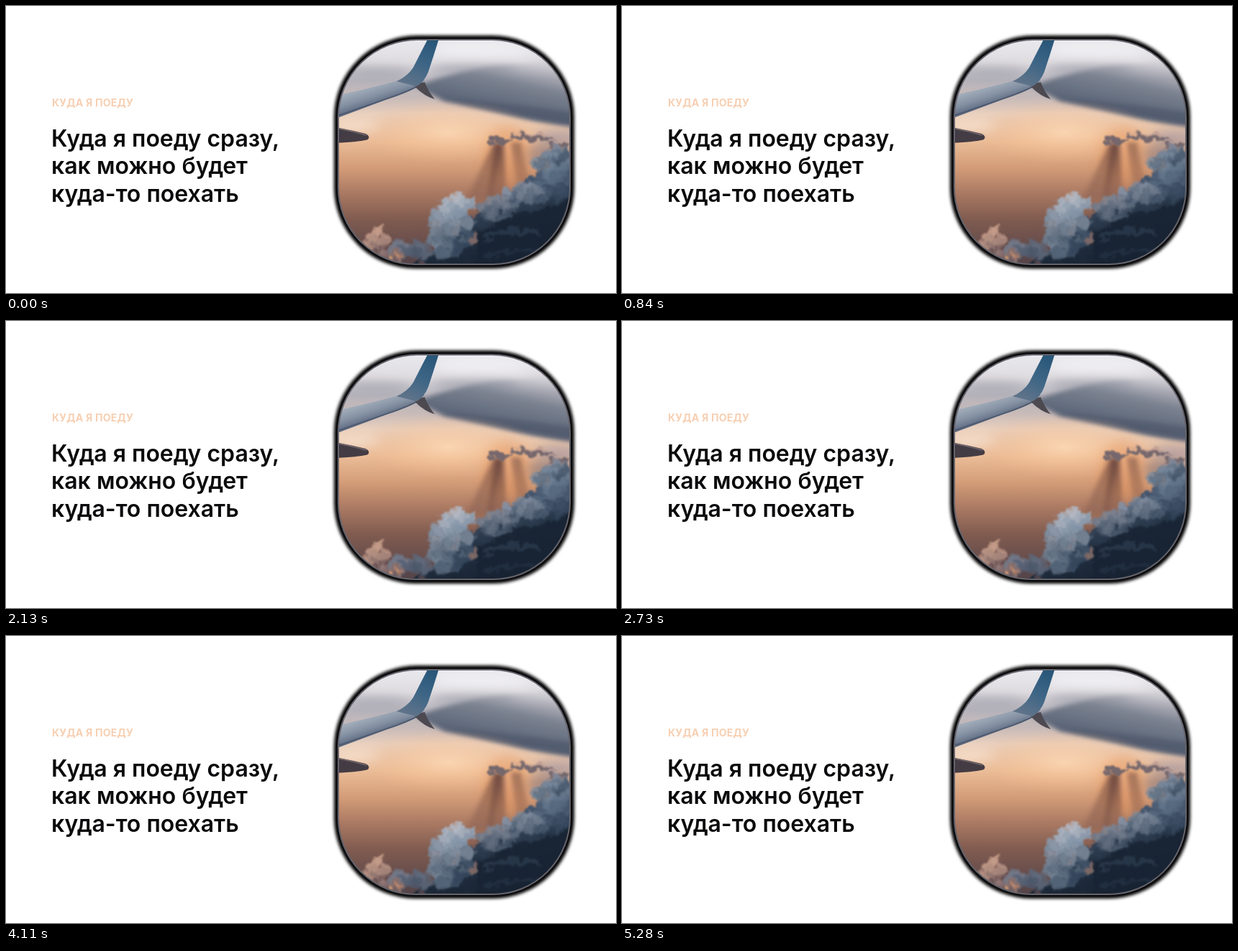
These frames come from a looping animation (848x400 px, 5310 ms). An HTML page:

```html
<!DOCTYPE html>
<html lang="ru">
<head>
<meta charset="utf-8">
<title>Куда я поеду</title>
<style>
  html, body { margin: 0; width: 100%; height: 100%; overflow: hidden; background: #fff; }
  svg { display: block; width: 848px; height: 400px; }
  text { font-family: Inter, "Liberation Sans", sans-serif; font-optical-sizing: none; font-variation-settings: "opsz" 14; }
  .label { font-size: 14px; font-weight: 700; letter-spacing: .25px; fill: #f7cfb2; }
  .title { font-size: 32px; font-weight: 600; fill: #0b0b0d; }
</style>
</head>
<body>
<svg viewBox="0 0 848 400" xmlns="http://www.w3.org/2000/svg">
  <defs>
    <path id="pane" d="M572 47H676A108 108 0 0 1 784 155V253A107 107 0 0 1 677 360H569A107 107 0 0 1 462 253V155A110 108 0 0 1 572 47Z"/>
    <clipPath id="inside"><use href="#pane"/></clipPath>
    <linearGradient id="sky" gradientUnits="userSpaceOnUse" x1="0" y1="47" x2="0" y2="360">
      <stop offset="0" stop-color="#e9e9ee"/>
      <stop offset=".1" stop-color="#dfdce0"/>
      <stop offset=".18" stop-color="#b9b5bd"/>
      <stop offset=".26" stop-color="#c7bab8"/>
      <stop offset=".33" stop-color="#e8cfbd"/>
      <stop offset=".45" stop-color="#ebbd98"/>
      <stop offset=".57" stop-color="#d39c78"/>
      <stop offset=".68" stop-color="#ab7a63"/>
      <stop offset=".8" stop-color="#805b50"/>
      <stop offset="1" stop-color="#544348"/>
    </linearGradient>
    <linearGradient id="bank" gradientUnits="userSpaceOnUse" x1="690" y1="72" x2="672" y2="158">
      <stop offset="0" stop-color="#a3a6b2" stop-opacity=".2"/>
      <stop offset=".35" stop-color="#7c8391"/>
      <stop offset=".7" stop-color="#626c7d"/>
      <stop offset="1" stop-color="#535c70"/>
    </linearGradient>
    <linearGradient id="wing" gradientUnits="userSpaceOnUse" x1="505" y1="112" x2="514" y2="140">
      <stop offset="0" stop-color="#a3adba"/>
      <stop offset=".5" stop-color="#8491a3"/>
      <stop offset="1" stop-color="#56627a"/>
    </linearGradient>
    <linearGradient id="tip" gradientUnits="userSpaceOnUse" x1="597" y1="47" x2="566" y2="112">
      <stop offset="0" stop-color="#265578"/>
      <stop offset=".55" stop-color="#3f6686"/>
      <stop offset="1" stop-color="#5f7389"/>
    </linearGradient>
    <radialGradient id="sun">
      <stop offset="0" stop-color="#ffdcb8"/>
      <stop offset=".5" stop-color="#fbc99d" stop-opacity=".55"/>
      <stop offset="1" stop-color="#f3b98c" stop-opacity="0"/>
    </radialGradient>
    <linearGradient id="ray" gradientUnits="userSpaceOnUse" x1="0" y1="190" x2="0" y2="275">
      <stop offset="0" stop-color="#67443d" stop-opacity=".85"/>
      <stop offset="1" stop-color="#67443d" stop-opacity=".2"/>
    </linearGradient>
    <linearGradient id="deep" gradientUnits="userSpaceOnUse" x1="690" y1="250" x2="720" y2="350">
      <stop offset="0" stop-color="#48586f"/>
      <stop offset=".5" stop-color="#233143"/>
      <stop offset="1" stop-color="#16212f"/>
    </linearGradient>
    <filter id="soft" x="-20%" y="-30%" width="140%" height="160%"><feGaussianBlur stdDeviation="3"/></filter>
    <filter id="haze" x="-30%" y="-50%" width="160%" height="200%"><feGaussianBlur stdDeviation="8"/></filter>
    <filter id="shade" x="-10%" y="-10%" width="120%" height="120%"><feGaussianBlur stdDeviation="2.2"/></filter>
    <filter id="fluff" filterUnits="userSpaceOnUse" x="450" y="160" width="350" height="220" color-interpolation-filters="sRGB">
      <feTurbulence type="fractalNoise" baseFrequency=".08" numOctaves="4" seed="7"/>
      <feDisplacementMap in="SourceGraphic" scale="18" xChannelSelector="R" yChannelSelector="G"/>
      <feGaussianBlur stdDeviation="1"/>
    </filter>
  </defs>

  <rect width="848" height="400" fill="#fff"/>
  <text class="label" x="64" y="140">КУДА Я ПОЕДУ</text>
  <text class="title" x="63" y="196">Куда я поеду сразу,</text>
  <text class="title" x="63" y="234.4">как можно будет</text>
  <text class="title" x="63" y="272.8">куда-то поехать</text>

  <use href="#pane" fill="none" stroke="#000" stroke-width="12" filter="url(#shade)"/>
  <use href="#pane" fill="#000" stroke="#0c0c0f" stroke-width="6"/>

  <g clip-path="url(#inside)">
    <rect x="460" y="45" width="326" height="318" fill="url(#sky)"/>

    <!-- high haze and the dark cloud bank -->
    <g filter="url(#haze)">
      <ellipse cx="660" cy="62" rx="70" ry="10" fill="#f0eff2"/>
      <ellipse cx="515" cy="94" rx="50" ry="7" fill="#a7a7b1"/>
      <ellipse cx="650" cy="89" rx="60" ry="6" fill="#9b9da9"/>
      <ellipse cx="485" cy="166" rx="36" ry="8" fill="#f6dfcc"/>
    </g>
    <path d="M570 112Q620 92 680 84T800 72V170Q740 160 700 152T610 133Z" fill="url(#bank)" filter="url(#soft)"/>
    <path d="M600 128Q690 134 800 150V169Q740 163 700 152T600 128Z" fill="#4d576b" opacity=".65" filter="url(#soft)"/>

    <!-- sunlight -->
    <ellipse id="glow" cx="615" cy="176" rx="125" ry="46" fill="url(#sun)" opacity=".72"/>
    <ellipse cx="696" cy="210" rx="34" ry="42" fill="#e6965f" opacity=".45" filter="url(#haze)"/>
    <g fill="url(#ray)" filter="url(#soft)">
      <path d="M678 190H690L676 270H640Z" opacity=".75"/>
      <path d="M680 192H692L696 270H668Z"/>
      <path d="M702 190H716L728 250H710Z" opacity=".6"/>
    </g>
    <ellipse cx="768" cy="184" rx="34" ry="10" fill="#a69aa5" opacity=".8" filter="url(#haze)"/>
    <ellipse cx="755" cy="207" rx="30" ry="14" fill="#8d7c80" opacity=".7" filter="url(#haze)"/>

    <!-- clouds -->
    <g filter="url(#fluff)">
      <g fill="#75676c">
        <ellipse cx="688" cy="188" rx="16" ry="4"/>
        <ellipse cx="712" cy="181" rx="13" ry="5"/>
        <ellipse cx="742" cy="185" rx="22" ry="3"/>
        <ellipse cx="768" cy="194" rx="16" ry="3"/>
        <ellipse cx="710" cy="178" rx="9" ry="2" fill="#dfae8c"/>
        <ellipse cx="738" cy="181" rx="14" ry="2" fill="#c3a093"/>
      </g>
      <path d="M560 370L610 330L650 290L690 272L725 240L800 220V375H560Z" fill="url(#deep)"/>
      <g id="puffs"></g>
      <path d="M655 322Q690 290 735 284T800 254V375H655Z" fill="#182433" opacity=".85"/>
      <path d="M664 324Q700 308 740 316" fill="none" stroke="#2d3d51" stroke-width="8" opacity=".7"/>
      <path d="M665 350Q705 337 756 343" fill="none" stroke="#243447" stroke-width="6" opacity=".7"/>
      <path d="M640 328L654 318L658 326L644 336Z" fill="#7b6765"/>
    </g>

    <!-- aircraft -->
    <path d="M458 125Q505 115 545 104L582 103L572 113Q558 121 530 130L458 157Z" fill="url(#wing)"/>
    <path d="M458 154L530 129Q560 119 575 110" fill="none" stroke="#4b586d" stroke-width="1.5"/>
    <path d="M569 109L582 106Q587 119 596 130Q582 126 569 113Z" fill="#4d4950"/>
    <path d="M587 45H602Q595 68 587 92Q582 105 571 112L543 105Q558 98 566 86Q575 68 587 45Z" fill="url(#tip)"/>
    <path d="M458 169Q480 173 500 178Q507 182 503 186Q496 189 458 191Z" fill="#443c44"/>
    <path d="M458 170Q480 174 501 180" fill="none" stroke="#776c70" stroke-width="1.5"/>
  </g>
  <use href="#pane" fill="none" stroke="#65646c" stroke-width="2"/>
</svg>
<script>
  const LOOP = 5310;
  const puffs = document.getElementById("puffs");

  let seed = 41;
  const rand = () => (seed = (seed * 16807) % 2147483647) / 2147483647;
  const mix = (a, b, k) => a.map((v, i) => Math.round(v + (b[i] - v) * k));

  function puff(cx, cy, r, rgb, opacity) {
    const c = document.createElementNS("http://www.w3.org/2000/svg", "circle");
    const attrs = { cx, cy, r, fill: `rgb(${rgb})`, opacity };
    for (const key in attrs) c.setAttribute(key, attrs[key]);
    puffs.append(c);
  }

  // Each cloud is an ellipse of puffs, bright at upper left and dark at lower right.
  function cloud(x, y, rx, ry, count, size, light, dark) {
    for (let i = 0; i < count; i++) {
      const a = rand() * Math.PI * 2, d = Math.sqrt(rand());
      const dx = Math.cos(a) * d, dy = Math.sin(a) * d;
      const k = Math.min(1, Math.max(0, .5 + dy * .4 + dx * .2 + (rand() - .5) * .45));
      puff(x + dx * rx, y + dy * ry, size * (.5 + rand() * .6), mix(light, dark, k), .7);
    }
  }

  const pale = [160, 172, 187], blue = [118, 138, 160], slate = [52, 69, 90];
  const peach = [222, 176, 150], mauve = [112, 92, 96];

  cloud(762, 234, 32, 30, 70, 9, blue, slate);
  cloud(770, 206, 15, 12, 18, 6, [134, 147, 165], slate);
  cloud(724, 263, 28, 16, 44, 7, [143, 153, 170], slate);
  cloud(682, 282, 26, 15, 40, 7, [145, 151, 164], slate);
  cloud(560, 341, 30, 13, 40, 7, [135, 136, 150], slate);
  cloud(514, 328, 18, 15, 36, 6, peach, mauve);
  cloud(528, 350, 24, 9, 26, 6, [150, 124, 121], mauve);
  cloud(617, 313, 30, 38, 110, 9, pale, slate);
  cloud(630, 279, 22, 13, 40, 7, [182, 187, 197], blue);
  cloud(540, 352, 12, 5, 7, 4, [232, 166, 119], mauve);

  document.getElementById("glow").animate(
    [{ opacity: .7 }, { opacity: .74 }, { opacity: .7 }],
    { duration: LOOP, iterations: Infinity, easing: "linear" }
  );
</script>
</body>
</html>
```
